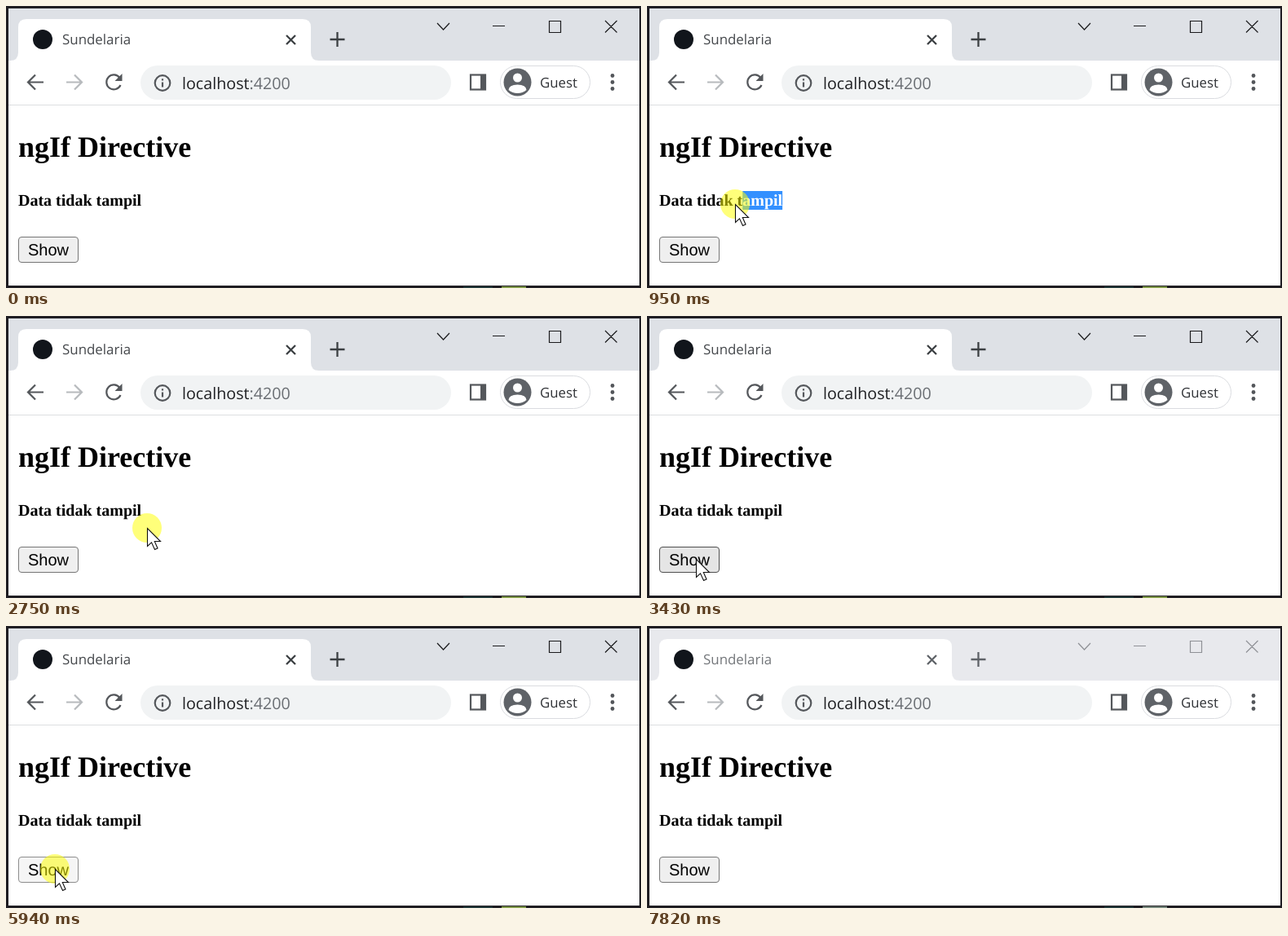
An HTML page that plays this animation: 779 by 346 pixels, repeating every 7.92 s.

```html
<!DOCTYPE html>
<html lang="id">
<head>
<meta charset="utf-8">
<title>ngIf Directive</title>
<style>
  html, body { margin: 0; width: 100%; height: 100%; overflow: hidden; background: #fff; }
  svg { display: block; width: 779px; height: 346px; }
  text { white-space: pre; text-rendering: geometricPrecision; }
  .ui { font-family: "Open Sans", "Noto Sans", sans-serif; }
  .serif { font: bold 20px "Liberation Serif", "Times New Roman", serif; }
  .btn { font: 20px "Liberation Sans", Arial, sans-serif; }
  .line { fill: none; stroke: #54575b; stroke-width: 2.2; }
  #bar { fill: #dee1e6; }
  #title { fill: #45484c; }
  #controls { fill: none; stroke: #1b1b1d; stroke-width: 1.2; }
  #tabIcons { fill: none; stroke: #3c4043; stroke-width: 2.3; }
  #strip { fill: #7f9848; }
  .blur #bar { fill: #e8e9ed; }
  .blur #title { fill: #74777b; }
  .blur #controls { stroke: #8f9196; }
  .blur #tabIcons { stroke: #5f6368; }
  .blur #strip { fill: #74857a; }
  #box { fill: #efefef; stroke: #767676; }
  .hover #box { fill: #e5e5e5; stroke: #4f4f4f; }
  .press #box { fill: #f5f5f5; stroke: #8d8d8d; }
</style>
</head>
<body>
<svg id="stage" viewBox="0 0 779 346">
  <rect width="779" height="346" fill="#1f1d22"/>
  <rect x="3" y="3" width="774" height="340" fill="#fff"/>

  <!-- title bar and tab -->
  <rect id="bar" x="3" y="3" width="774" height="64"/>
  <path d="M5 67Q15 67 15 57V26Q15 16 25 16H364Q374 16 374 26V57Q374 67 384 67Z" fill="#fff"/>
  <circle cx="45" cy="41" r="12" fill="#11151b"/>
  <text id="title" class="ui" x="69" y="47" font-size="16.9">Sundelaria</text>
  <path id="tabIcons" d="M344 36L355 47M355 36L344 47M397.5 41H415.5M406.500 32V50"/>
  <path id="controls" d="M529 21L536.500 29L544 21M597 24.500H612M666.500 18.500H680.500V32.500H666.500ZM735 18L749.500 32.500M749.500 18L735 32.500"/>

  <!-- toolbar -->
  <path class="line" d="M46 93.500H27.500M36 84.500L27 93.500L36 102.500"/>
  <path class="line" style="stroke:#b7babd" d="M74 93.500H92.500M84 84.500L93 93.500L84 102.500"/>
  <path class="line" d="M139.500 88A9 9 0 1 0 140.500 97"/>
  <path d="M142.500 83V92H133.500Z" fill="#54575b"/>
  <rect x="165" y="73" width="381" height="42" rx="21" fill="#f1f3f4"/>
  <circle class="line" cx="192" cy="94.500" r="9.300"/>
  <path class="line" d="M192 93.500V99.500M192 89.300V91.600"/>
  <text class="ui" x="216" y="102" font-size="19.7" fill="#202124">localhost<tspan fill="#6a6e73">:4200</tspan></text>
  <rect class="line" x="570" y="84.500" width="18" height="18"/>
  <rect x="582" y="84" width="7" height="19" fill="#54575b"/>
  <rect x="606.500" y="73.500" width="110" height="40" rx="20" fill="#fff" stroke="#dadce0"/>
  <circle cx="627.500" cy="93.500" r="17" fill="#5f6368"/>
  <circle cx="627.500" cy="88" r="5.500" fill="#fff"/>
  <path d="M616.500 103Q617 96.500 627.500 96.500T638.500 103Q634 107 627.500 107T616.500 103Z" fill="#fff"/>
  <text class="ui" x="655" y="100" font-size="16.8" fill="#303236">Guest</text>
  <g fill="#54575b">
    <circle cx="744" cy="85.500" r="2.400"/><circle cx="744" cy="93.500" r="2.400"/><circle cx="744" cy="101.500" r="2.400"/>
  </g>
  <rect x="3" y="121" width="774" height="1" fill="#dcdee1"/>

  <!-- page -->
  <text class="serif" x="15" y="185" style="font-size:36px">ngIf Directive</text>
  <text id="msg" class="serif" x="15" y="245">Data tidak tampil</text>
  <clipPath id="clip"><rect id="range" y="227" width="0" height="23"/></clipPath>
  <g clip-path="url(#clip)">
    <rect x="15" y="227" width="152" height="23" fill="#3390ff"/>
    <text class="serif" x="15" y="245" fill="#fff">Data tidak tampil</text>
  </g>
  <g id="button">
    <rect id="box" x="15.500" y="283.500" width="73" height="31" rx="3.500"/>
    <text id="label" class="btn" x="27" y="306">Show</text>
  </g>

  <rect x="561" y="344" width="36" height="2" fill="#203638"/>
  <rect id="strip" x="608" y="344" width="30" height="2"/>

  <g id="pointer">
    <circle id="halo" r="18" fill="#ff0" fill-opacity=".52"/>
    <path d="M.5 .5V22.500L5.500 17.800L9.500 26.500L13 25L9.300 16.500H16.500Z" fill="#fff" stroke="#111" stroke-width="1.100"/>
  </g>
</svg>
<script>
  const LOOP = 7920;
  const $ = id => document.getElementById(id);

  // Moves run in discrete steps: start, end, number of steps.
  const moves = [[150, 900, 15], [950, 1310, 8], [1630, 1920, 6],
                 [2100, 2590, 8], [2750, 3430, 13], [6980, 7100, 3]];

  // Pointer path: time, x, y, easing of the stretch that leads there.
  const linear = k => k;
  const out = k => 1 - (1 - k) ** 2;
  const inOut = k => k * k * (3 - 2 * k);
  const path = [
    [150, 330, 345, linear], [260, 308, 308, linear], [460, 205, 254, linear],
    [650, 172, 243, out], [800, 166, 243, linear], [900, 132, 243, linear],
    [950, 108, 243, linear], [1310, 5, 251, out], [1630, 5, 251, linear],
    [1920, 211, 228, inOut], [2050, 211, 228, linear], [2590, 173, 260, inOut],
    [2850, 173, 260, linear], [3430, 60, 298, inOut], [6930, 60, 298, linear],
    [6980, 110, 304, linear], [7040, 293, 330, linear], [7100, 360, 380, linear]
  ];

  const presses = [[800, 1630], [2750, 2850], [3890, 4050],
                   [4990, 5210], [5940, 6030], [6660, 6780]];
  const toggles = [3970, 5140, 6030, 6780];

  const msg = $('msg');
  const edges = [...msg.textContent].map((c, i) => msg.getStartPositionOfChar(i).x);
  const right = 15 + msg.getComputedTextLength();
  edges.push(right);

  function stepped(t) {
    const move = moves.filter(m => m[0] <= t).pop();
    if (!move) return 0;
    const [start, end, n] = move;
    const gap = (end - start) / (n - 1);
    return Math.min(end, start + Math.floor((t - start) / gap + 1e-6) * gap);
  }

  function pointerAt(t) {
    const i = path.findIndex(p => p[0] > t);
    if (i < 0) return path[path.length - 1].slice(1, 3);
    if (i === 0) return path[0].slice(1, 3);
    const [t0, x0, y0] = path[i - 1], [t1, x1, y1, ease] = path[i];
    const k = ease((t - t0) / (t1 - t0));
    return [x0 + (x1 - x0) * k, y0 + (y1 - y0) * k];
  }

  function selectionLeft(t) {
    if (t < 800 || t >= 2750) return right;
    const x = t < 1310 ? pointerAt(stepped(t))[0] + 9 : 15;
    return edges.reduce((a, b) => Math.abs(b - x) < Math.abs(a - x) ? b : a);
  }

  function setText(node, value) {
    if (node.textContent !== value) node.textContent = value;
  }

  function draw(t) {
    const [x, y] = pointerAt(stepped(t));
    const down = presses.some(([a, b]) => t >= a && t < b);
    const count = toggles.filter(s => t >= s).length;
    const shown = count % 2 === 1;
    const over = x > 15 && x < (shown ? 80 : 89) && y > 283 && y < 315;
    const fresh = toggles.some(s => t >= s && t < s + 80);

    $('stage').classList.toggle('blur', t >= 7820);
    $('pointer').style.display = t >= 150 && t < 7100 ? '' : 'none';
    $('pointer').setAttribute('transform', `translate(${x.toFixed(1)} ${y.toFixed(1)})`);
    $('halo').style.display = down ? '' : 'none';

    setText(msg, shown ? 'Halo aku tampil' : 'Data tidak tampil');
    setText($('label'), shown ? 'Hide' : 'Show');
    $('box').setAttribute('width', shown ? 64 : 73);
    $('button').setAttribute('class', !over ? '' : down && !fresh ? 'press' : 'hover');

    const left = selectionLeft(t);
    $('range').setAttribute('x', left);
    $('range').setAttribute('width', right - left);
  }

  function tick() {
    draw(performance.now() % LOOP);
    requestAnimationFrame(tick);
  }
  tick();
</script>
</body>
</html>
```
